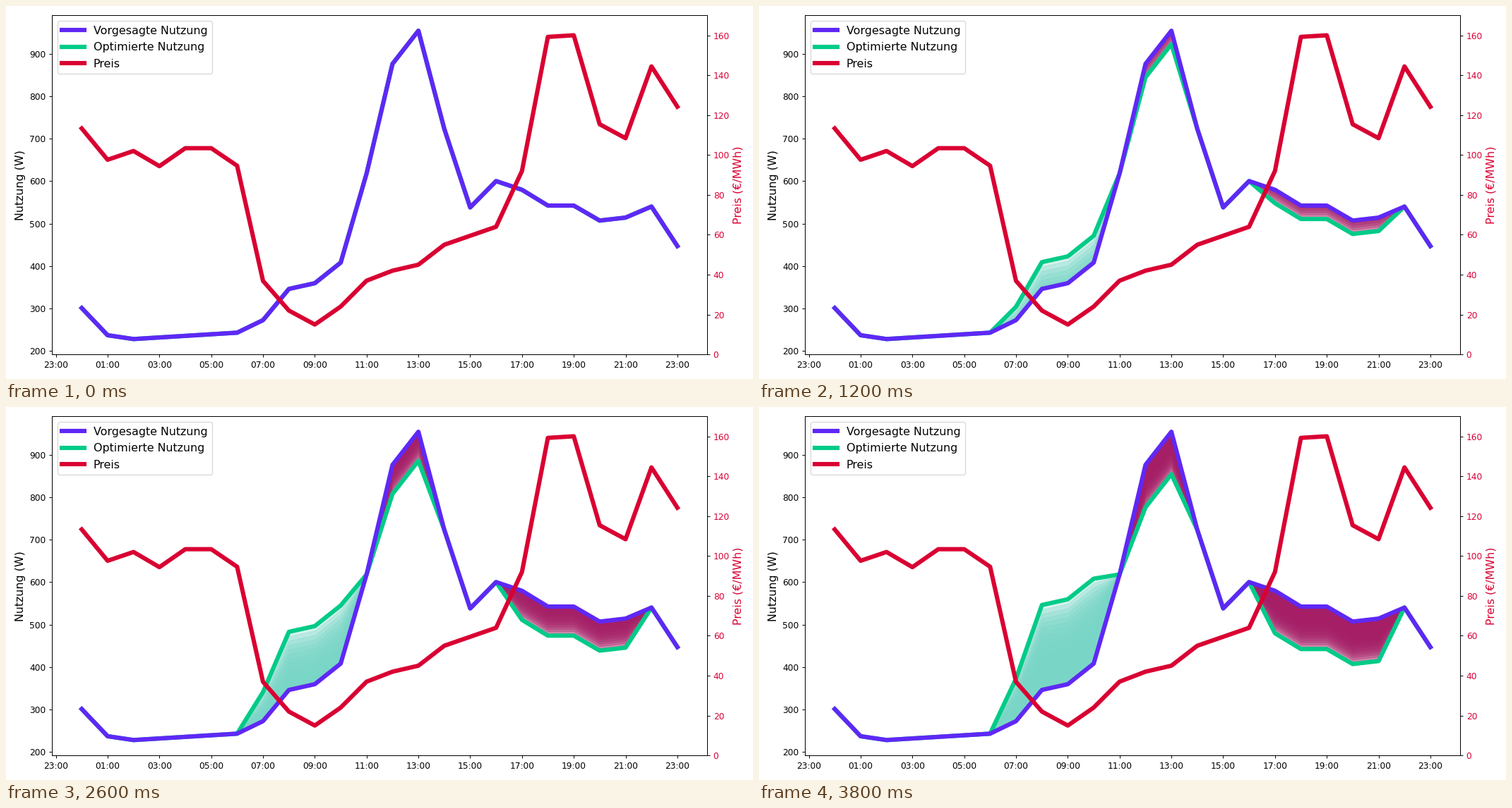
Recreate the animation shown at these times as a matplotlib script. Size 1058 by 529 pixels, loop 4 s.

```python
import numpy as np
import matplotlib.pyplot as plt
from matplotlib.animation import FuncAnimation

W, H = 1058, 529
FRAMES, INTERVAL = 20, 200
PURPLE, GREEN, RED = "#5f28f5", "#00cb88", "#d90032"
RISE_FILL, DROP_FILL, FILL_ALPHA = "#79d6c7", "#a51e66", 0.3
LINE_WIDTH, FONT = 5, 13

# Hourly load: flat night, steep noon peak, falling evening
night = np.linspace(228, 243, 5)
usage = np.r_[301, 237, night, 272.5, 346, 359.5, 408, 618, 876, 954, 723, 538,
              600, 579.5, 542.3, 542.3, 507, 514, 540, 447]
# Hourly price: high night, cheap morning, afternoon climb, evening peak
price = np.r_[113.3, 97.6, 102, 94.4, 103.4, 103.4, 94.6, 36.9, 22, 15, 24, 37,
              42, 45, np.linspace(55, 64, 3), 92, 159.2, 160, 115.4, 108.4, 144.4, 124.2]
hours = np.arange(usage.size)

# Noon and evening hours give up 100 W each; the cheapest hours take up to 200 W
shift = np.where((hours // 2 == 6) | ((hours >= 17) & (hours <= 21)), -100, 0)
left = -shift.sum()
for h in np.argsort(price):
    take = min(200, left)
    shift[h] += take
    left -= take


def optimised(k):
    return usage + shift * k / (FRAMES - 1)


def padded(values, part=0.05):
    pad = part * np.ptp(values)
    return values.min() - pad, values.max() + pad


fig, ax = plt.subplots(figsize=(12, 6), dpi=W / 12)
price_ax = ax.twinx()

usage_line, = ax.plot(hours, usage, color=PURPLE, lw=LINE_WIDTH, zorder=4,
                      label="Vorgesagte Nutzung")
opt_line, = ax.plot(hours, usage, color=GREEN, lw=LINE_WIDTH, zorder=3,
                    label="Optimierte Nutzung")
price_line, = price_ax.plot(hours, price, color=RED, lw=LINE_WIDTH, label="Preis")

# Every step adds one translucent layer, so the bands deepen towards the usage line
layers = []
for k in range(1, FRAMES):
    target = optimised(k)
    layers.append([
        ax.fill_between(hours, usage, edge(usage, target), color=color,
                        alpha=FILL_ALPHA, zorder=1)
        for edge, color in ((np.maximum, RISE_FILL), (np.minimum, DROP_FILL))
    ])

ax.set_xlim(padded(hours))
ax.set_ylim(padded(usage))
price_ax.set_ylim(0, price.max() + 10)
ticks = range(-1, 24, 2)
ax.set_xticks(ticks, [f"{t % 24:02d}:00" for t in ticks])
price_ax.tick_params(axis="y", labelcolor=RED)
ax.set_ylabel("Nutzung (W)", fontsize=FONT)
price_ax.set_ylabel("Preis (€/MWh)", fontsize=FONT, color=RED)
ax.legend(handles=[usage_line, opt_line, price_line], loc="upper left",
          fontsize=FONT, labelspacing=0.55)
fig.tight_layout()


def update(k):
    opt_line.set_ydata(optimised(k))
    for i, pair in enumerate(layers):
        for layer in pair:
            layer.set_visible(i < k)
    return [opt_line]


anim = FuncAnimation(fig, update, frames=FRAMES, interval=INTERVAL,
                     init_func=lambda: update(0), repeat=True, repeat_delay=0)
plt.show()
```
